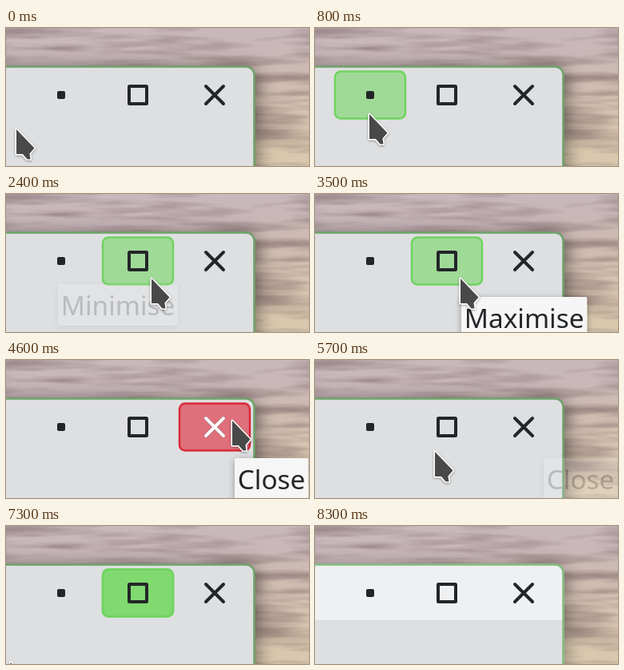
Recreate the animation shown at these times as an HTML page. Size 379x173 px, loop 8400 ms.

```html
<!DOCTYPE html>
<html lang="en">
<head>
<meta charset="utf-8">
<title>Window buttons</title>
<style>
  html, body { margin: 0; width: 100%; height: 100%; overflow: hidden; }
  svg { display: block; width: 379px; height: 173px; }
  .hover { fill: #a0da97; stroke: #6fd45f; stroke-width: 2.5; }
  .hover.press { fill: #80da70; }
  .hover.red { fill: #df6f7b; stroke: #d9283a; }
  .icon { fill: none; stroke: #232629; stroke-width: 4; stroke-linecap: round; }
  .white { stroke: #fff; }
  .tip rect { fill: #f6f6f6; }
  .tip text { font: 33.33px "Noto Sans", "Open Sans", sans-serif; fill: #232629; }
</style>
</head>
<body>
<svg viewBox="0 0 379 173">
  <defs>
    <linearGradient id="sky" x2=".15" y2="1">
      <stop offset="0" stop-color="#c8b9bd"/>
      <stop offset=".28" stop-color="#c9b7b9"/>
      <stop offset=".5" stop-color="#cfbbb0"/>
      <stop offset=".75" stop-color="#d6c3b0"/>
      <stop offset="1" stop-color="#dac8ae"/>
    </linearGradient>
    <filter id="streaks" x="0" y="0" width="1" height="1" color-interpolation-filters="sRGB">
      <feTurbulence type="fractalNoise" baseFrequency=".008 .07" numOctaves="3" seed="4"/>
      <feColorMatrix values="0 0 0 0 .42  0 0 0 0 .33  0 0 0 0 .34  1.2 0 0 0 -.48"/>
    </filter>
    <filter id="blur" x="-20%" y="-40%" width="140%" height="180%"><feGaussianBlur stdDeviation="13"/></filter>
    <filter id="tipShade" x="-20%" y="-40%" width="140%" height="180%">
      <feDropShadow dx="0" dy="2" stdDeviation="4" flood-opacity=".35"/>
    </filter>
    <filter id="cursorShade" x="-40%" y="-40%" width="180%" height="180%">
      <feDropShadow dx="0" dy="1" stdDeviation="1.5" flood-opacity=".4"/>
    </filter>
    <path id="cross" d="M250 73l22 22m0-22l-22 22"/>
  </defs>

  <rect width="379" height="173" fill="url(#sky)"/>
  <rect width="379" height="173" filter="url(#streaks)"/>
  <rect id="shadow" x="-60" y="52" width="372" height="220" rx="12" filter="url(#blur)"/>

  <rect x="-20" y="48.5" width="330.5" height="200" rx="10" fill="#dedfe1"/>
  <path id="header" d="M-20 118V48.5H300.5a10 10 0 0 1 10 10V118z" fill="#eff0f1"/>
  <rect id="frame" x="-20" y="48.5" width="330.5" height="200" rx="10" fill="none" stroke-width="2.6"/>

  <g id="hovers"></g>
  <rect x="64" y="79" width="10" height="10" rx="2" fill="#232629"/>
  <rect class="icon" x="154" y="73" width="22" height="22" rx=".5"/>
  <use href="#cross" class="icon"/>
  <use href="#cross" class="icon white" id="closeIcon"/>
  <g id="tips"></g>

  <g id="cursor" filter="url(#cursorShade)">
    <path d="M1 1V32H9L14.5 38.5H18.5L17.5 31.5L23.5 24.5z" fill="#4a4a4a" stroke="#fff"
      stroke-width="3" stroke-linejoin="round" paint-order="stroke"/>
  </g>
</svg>
<script>
  const LOOP = 8400, STEP = 100, ACTIVE_AT = 8300;
  const TIP_DELAY = 600, TIP_LINGER = 200, TIP_FADE = 300, HOVER_FADE = 200;
  const $ = id => document.getElementById(id);

  const home = { x: 12, y: 126 };
  const moves = [
    { from: 200, to: 800, x: 67, y: 107 },
    { from: 1900, to: 2400, x: 181, y: 105 },
    { from: 3500, to: 4200, x: 282, y: 75 },
    { from: 5000, to: 5500, x: 195, y: 130 },
    { from: 5600, to: 5700, x: 149, y: 114 },
    { from: 5800, to: 6000, x: 149, y: 93 },
    { from: 6500, to: 6900, x: 114, y: 133 },
    { from: 7000, to: 7400, x: -32, y: 182 }
  ];

  // A pressed button stays lit until release, after the cursor has left.
  const visits = [
    { button: 0, label: "Minimise", enter: 600, leave: 2000, x: 65, y: 113 },
    { button: 1, label: "Maximise", enter: 2100, leave: 3600, x: 183, y: 129 },
    { button: 2, label: "Close", enter: 3700, leave: 5300, x: 286, y: 123 },
    { button: 1, label: "Maximise", enter: 5800, leave: 6500, x: 153, y: 127, press: 6300, release: 7500 }
  ];

  const ramp = (t, from, span) => Math.min(1, Math.max(0, (t - from) / span));
  const soften = p => p ** 1.5;

  function add(parent, name, attrs) {
    const el = document.createElementNS("http://www.w3.org/2000/svg", name);
    for (const key in attrs) el.setAttribute(key, attrs[key]);
    return parent.appendChild(el);
  }

  function addHover(button, kind) {
    return add($("hovers"), "rect",
      { class: "hover " + kind, x: 25 + 96 * button, y: 54.5, width: 88, height: 59, rx: 7 });
  }

  function addTip({ label, x, y }) {
    const tip = add($("tips"), "g", { class: "tip", transform: `translate(${x} ${y})` });
    const box = add(tip, "rect", { height: 52, rx: 2, filter: "url(#tipShade)" });
    const text = add(tip, "text", { x: 3.8, y: 39 });
    text.textContent = label;
    box.setAttribute("width", text.getComputedTextLength() + 7.6);
    return tip;
  }

  for (const visit of visits) {
    visit.hover = addHover(visit.button, visit.button === 2 ? "red" : "");
    if (visit.press) visit.down = addHover(visit.button, "press");
    visit.tip = addTip(visit);
  }

  function cursorAt(t) {
    return moves.reduce(({ x, y }, move) => {
      const p = ramp(t, move.from, move.to - move.from);
      return { x: x + (move.x - x) * p, y: y + (move.y - y) * p };
    }, home);
  }

  function drawVisit(visit, t) {
    const { enter, leave, press, release } = visit;
    const lit = ramp(t, enter, HOVER_FADE) *
      (release ? 1 - ramp(t, release, STEP) : 1 - ramp(t, leave, HOVER_FADE));
    visit.hover.style.opacity = lit;
    if (press) visit.down.style.opacity = lit * ramp(t, press, HOVER_FADE);
    if (visit.button === 2) $("closeIcon").style.opacity = lit;
    visit.tip.style.opacity = soften(ramp(t, enter + TIP_DELAY, TIP_FADE)) *
      soften(1 - ramp(t, leave + TIP_LINGER, TIP_FADE));
  }

  function draw(t) {
    const active = t >= ACTIVE_AT;
    const { x, y } = cursorAt(t);
    visits.forEach(visit => drawVisit(visit, t));
    $("cursor").setAttribute("transform", `translate(${x} ${y})`);
    $("header").style.opacity = active ? 1 : 0;
    $("shadow").style.opacity = active ? .4 : .55;
    $("frame").setAttribute("stroke", active ? "#84be80" : "#6fa26a");
  }

  const start = performance.now();
  function tick() {
    const t = (performance.now() - start) % LOOP;
    draw(Math.floor(t / STEP) * STEP);
    requestAnimationFrame(tick);
  }
  tick();
</script>
</body>
</html>
```
